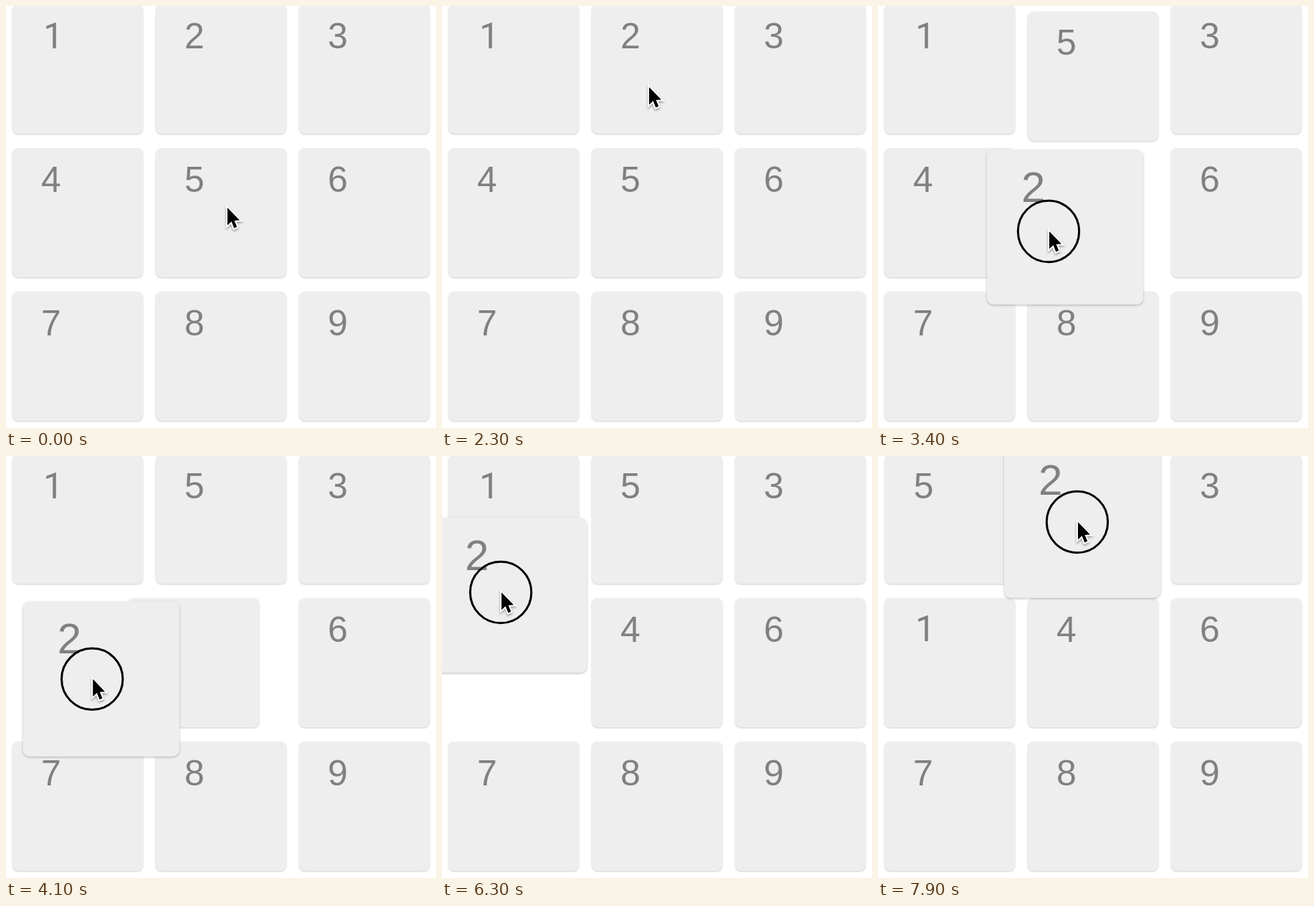
An HTML page for the animation above (8 s loop, 600x588 px).

```html
<!DOCTYPE html>
<html lang="en">
<head>
<meta charset="utf-8">
<title>Sortable grid</title>
<style>
  html, body { margin: 0; width: 100%; height: 100%; overflow: hidden; background: #fff; }
  svg { display: block; width: 600px; height: 588px; }
  rect { fill: #eee; filter: drop-shadow(0 1.5px 1px rgba(0, 0, 0, .2)); }
  .lifted rect { filter: drop-shadow(0 1.5px 1.5px rgba(0, 0, 0, .25)); }
  text { font: 50px "Liberation Sans", Arial, sans-serif; fill: #808080; text-anchor: middle; }
  .one { font-family: Roboto, sans-serif; }
  #press { fill: none; stroke: #000; stroke-width: 3; }
  #arrow { stroke: #fff; stroke-width: 4; paint-order: stroke; filter: drop-shadow(0 2px 1.5px rgba(0, 0, 0, .35)); }
</style>
</head>
<body>
<svg viewBox="0 0 600 588">
  <g id="tiles"></g>
  <g id="pointer">
    <circle id="press" r="42.7"/>
    <path id="arrow" d="M1 0V24.5L6.6 19.3L10.3 28.5L14.3 26.8L10.6 18L18 17.6Z"/>
  </g>
</svg>
<script>
const LOOP = 8000, STEP = 100, LIFT = 2700;
const SETTLE = 150, LIFT_SETTLE = 70, LAG = 100;
const GRAB = [9, -2];

// Pointer path: time, x, y
const path = [
  [200, 308, 281], [400, 287, 204], [700, 272, 51], [1000, 290, 96],
  [1400, 290, 96], [1600, 289, 90], [1900, 288, 146], [2200, 288, 148],
  [2300, 288, 113], [2400, 289, 97], [2700, 290, 94], [2900, 288, 192],
  [3100, 277, 286], [3300, 252, 310], [3400, 238, 314], [3500, 215, 317],
  [3900, 128, 314], [4500, 113, 303], [5200, 112, 296], [5900, 112, 296],
  [6100, 93, 222], [6200, 84, 196], [6300, 82, 190], [6600, 86, 102],
  [6800, 96, 92], [7000, 200, 88], [7100, 236, 88], [7200, 238, 88],
  [7900, 278, 92]
];

// Tile number -> [start time, destination cell]
const moves = {
  5: [[2950, 1], [7012, 0]],
  4: [[3850, 4]],
  1: [[6405, 3]]
};

const mix = (a, b, k) => a.map((v, i) => v + (b[i] - v) * k);
const cell = i => [100 + 200 * (i % 3), 88 + 200 * Math.floor(i / 3)];
const settle = (t, tau) => t > 0 ? 1 - Math.exp(-t / tau) : 0;
const within = (t, a, b) => t >= a && t < b;

const slope = (i, axis) =>
  (path[i + 1][axis] - path[i][axis]) / (path[i + 1][0] - path[i][0]);

// Harmonic mean of neighbouring slopes keeps the curve free of overshoot
function tangent(i, axis) {
  if (i === 0 || i === path.length - 1) return 0;
  const a = slope(i - 1, axis), b = slope(i, axis);
  return a * b > 0 ? 2 * a * b / (a + b) : 0;
}

function pointerAt(t) {
  const next = path.findIndex(p => p[0] >= t);
  if (next === 0) return path[0].slice(1);
  if (next < 0) return path[path.length - 1].slice(1);
  const i = next - 1, span = path[next][0] - path[i][0];
  const k = (t - path[i][0]) / span, rest = 1 - k;
  return [1, 2].map(axis =>
    path[i][axis] * (1 + 2 * k) * rest * rest +
    path[next][axis] * (1 + 2 * rest) * k * k +
    span * k * rest * (tangent(i, axis) * rest - tangent(next, axis) * k));
}

function place(node, [x, y], scale = 1) {
  node.setAttribute("transform", `translate(${x.toFixed(2)} ${y.toFixed(2)}) scale(${scale.toFixed(4)})`);
}

function make(name, attrs, parent) {
  const node = document.createElementNS("http://www.w3.org/2000/svg", name);
  for (const key in attrs) node.setAttribute(key, attrs[key]);
  return parent.appendChild(node);
}

const layer = document.getElementById("tiles");
const pointer = document.getElementById("pointer");
const press = document.getElementById("press");

const tiles = {};
for (const n of [1, 3, 4, 5, 6, 7, 8, 9, 2]) {
  const g = tiles[n] = make("g", {}, layer);
  make("rect", { x: -91, y: -90, width: 182, height: 180, rx: 8 }, g);
  const label = make("text", { x: n === 1 ? -34 : -37, y: -29.5 }, g);
  label.textContent = n;
  if (n === 1) label.setAttribute("class", "one");
  place(g, cell(n - 1));
}

function render(t) {
  place(pointer, pointerAt(t));
  press.style.display = within(t, 1200, 2000) || t >= 2400 ? "" : "none";

  for (const n in moves) {
    const pos = moves[n].reduce(
      (p, [start, to]) => mix(p, cell(to), settle(t - start, SETTLE)), cell(n - 1));
    place(tiles[n], pos);
  }

  const lift = settle(t - LIFT, LIFT_SETTLE);
  const held = pointerAt(t - LAG).map((v, i) => v + GRAB[i]);
  place(tiles[2], mix(cell(1), held, lift), 1 + 0.2 * lift);
  tiles[2].setAttribute("class", lift ? "lifted" : "");
}

const begin = performance.now();
function tick() {
  const t = (performance.now() - begin) % LOOP;
  render(Math.floor(t / STEP) * STEP);
  requestAnimationFrame(tick);
}
tick();
</script>
</body>
</html>
```
